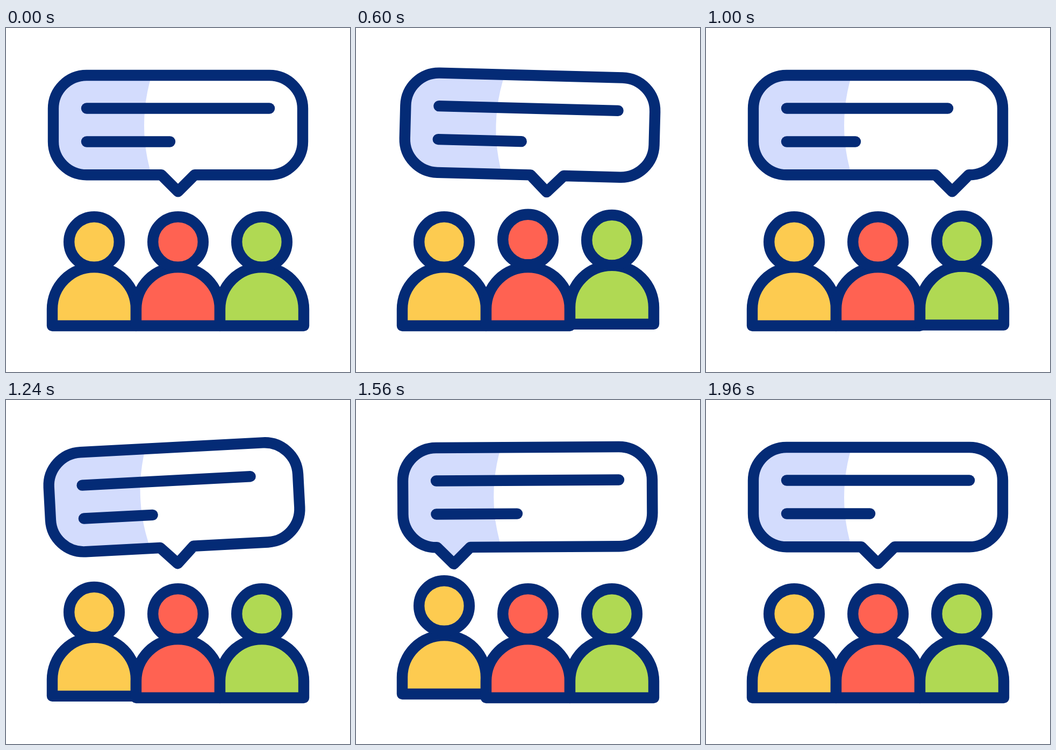
Animation, 640 px wide and 640 px high, one loop 2000 ms. Source, as an HTML page with a canvas:

```html
<!DOCTYPE html>
<html lang="en">
<head>
<meta charset="utf-8">
<title>Group talk</title>
<style>
  html, body { margin: 0; width: 100%; height: 100%; overflow: hidden; background: #fff; }
  canvas { display: block; width: 100vmin; height: 100vmin; margin: 0 auto; }
</style>
</head>
<body>
<canvas id="stage" width="640" height="640"></canvas>
<script>
const ctx = document.getElementById('stage').getContext('2d');
const LOOP = 2000, STEP = 40;
const NAVY = '#042b76', PALE = '#d3dcfd';
const HEAD_RISE = 15, BODY_RISE = 7;

// Piecewise linear value from [time, value] keys
function track(t, keys) {
  if (t <= keys[0][0]) return keys[0][1];
  for (let i = 1; i < keys.length; i++) {
    const [t0, a] = keys[i - 1], [t1, b] = keys[i];
    if (t < t1) return a + (b - a) * (t - t0) / (t1 - t0);
  }
  return keys[keys.length - 1][1];
}

const TAIL = [[480, 320], [960, 458], [1000, 458], [1480, 182], [1600, 182], [1960, 320]];
const TILT = [[480, 0], [720, 3], [960, 0], [1000, 0], [1240, -3], [1600, 0]];
const LONG = [[560, 490], [800, 450], [1160, 450], [1400, 490]];
const SHORT = [[760, 305], [1000, 278], [1360, 278], [1600, 305]];

// up: start of rise; head, body: start of fall
const people = [
  { x: 164, color: '#fdcb50', up: 1195, head: 1740, body: 1840 },
  { x: 320, color: '#ff6252', up: 155, head: 460, body: 460 },
  { x: 476, color: '#b0d953', up: 555, head: 820, body: 920 }
];

function hop(t, up, down, rise, span) {
  return track(t, [[up, 0], [up + span, rise], [down, rise], [down + span, 0]]);
}

function paint(path, color) {
  ctx.fillStyle = color;
  ctx.fill(path);
  ctx.stroke(path);
}

function drawPerson(p, t) {
  const bodyY = -hop(t, p.up, p.body, BODY_RISE, 100);
  const headY = 398 - hop(t, p.up, p.head, HEAD_RISE, 200);

  const body = new Path2D();
  body.moveTo(p.x - 78, 554 + bodyY);
  body.arc(p.x, 523 + bodyY, 78, Math.PI, 0);
  body.lineTo(p.x + 78, 554 + bodyY);
  body.closePath();
  paint(body, p.color);

  const head = new Path2D();
  head.arc(p.x, headY, 46.8, 0, Math.PI * 2);
  paint(head, p.color);
}

function bubblePath(tail) {
  const p = new Path2D(), l = 88, r = 552, top = 88, low = 273.3, rad = 62;
  p.moveTo(l + rad, top);
  p.arcTo(r, top, r, low, rad);
  p.arcTo(r, low, l, low, rad);
  p.lineTo(tail + 31, low);
  p.lineTo(tail, 304.2);
  p.lineTo(tail - 31, low);
  p.arcTo(l, low, l, top, rad);
  p.arcTo(l, top, r, top, rad);
  p.closePath();
  return p;
}

function bar(x, y) {
  ctx.beginPath();
  ctx.moveTo(150, y);
  ctx.lineTo(x, y);
  ctx.stroke();
}

function drawBubble(t) {
  const path = bubblePath(track(t, TAIL));
  ctx.save();
  ctx.translate(320, 314);
  ctx.rotate(track(t, TILT) * Math.PI / 180);
  ctx.translate(-320, -314);

  // Pale side, cut off by a large white disc
  ctx.save();
  ctx.clip(path);
  ctx.fillStyle = PALE;
  ctx.fillRect(80, 80, 240, 240);
  ctx.fillStyle = '#fff';
  ctx.beginPath();
  ctx.arc(576, 181, 319, 0, Math.PI * 2);
  ctx.fill();
  ctx.restore();

  ctx.stroke(path);
  bar(track(t, LONG), 149.5);
  bar(track(t, SHORT), 211.5);
  ctx.restore();
}

function draw(t) {
  ctx.fillStyle = '#fff';
  ctx.fillRect(0, 0, 640, 640);
  ctx.strokeStyle = NAVY;
  ctx.lineWidth = 20.4;
  ctx.lineCap = ctx.lineJoin = 'round';
  people.forEach(p => drawPerson(p, t));
  drawBubble(t);
}

const start = performance.now();
function tick() {
  const t = (performance.now() - start) % LOOP;
  draw(Math.floor(t / STEP) * STEP);
  requestAnimationFrame(tick);
}
tick();
</script>
</body>
</html>
```
